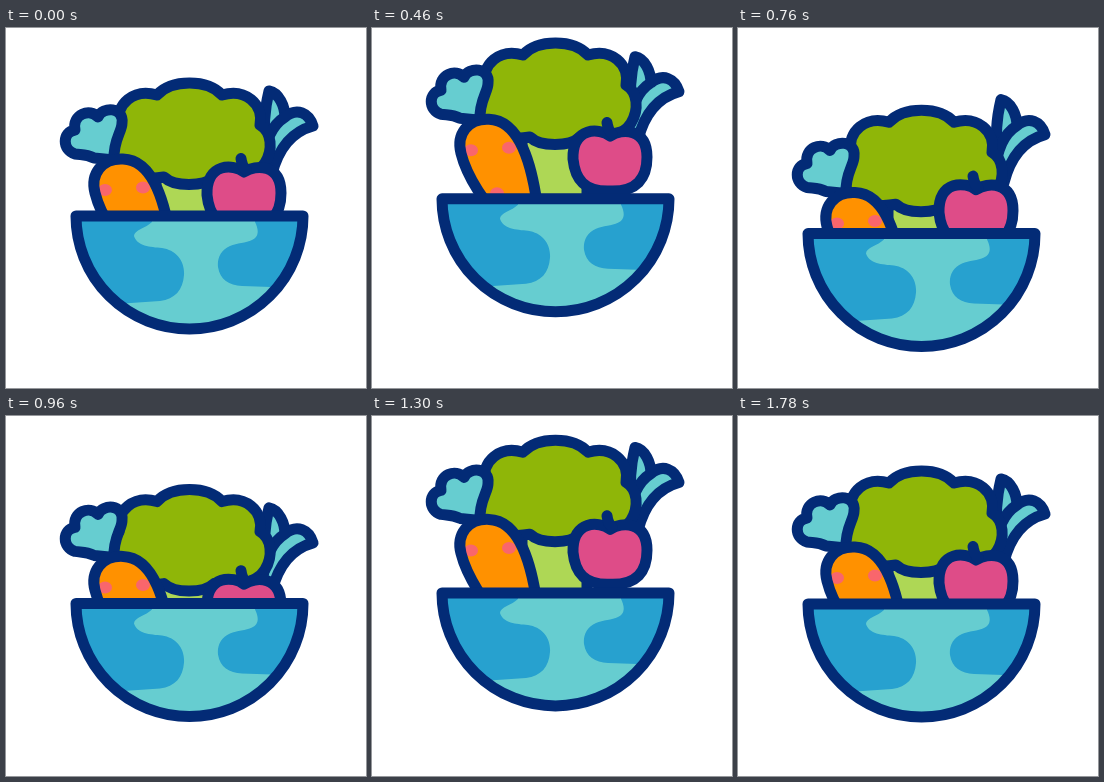
These frames come from a looping animation (360 by 360 pixels, 2.4 s). An HTML page:

```html
<!DOCTYPE html>
<html lang="en">
<head>
<meta charset="utf-8">
<title>Bouncing vegetable bowl</title>
<style>
  html, body { margin: 0; width: 100%; height: 100%; overflow: hidden; background: #fff; }
  svg { display: block; width: 100%; height: 100%; }
  .line { stroke: #032b76; stroke-width: 11; stroke-linejoin: round; stroke-linecap: round; }
  .cyan { fill: #66cdd0; }
  .blue { fill: #27a1cf; }
  .none { fill: none; }
</style>
</head>
<body>
<svg viewBox="0 0 360 360">
  <defs>
    <clipPath id="carrotShape">
      <path id="carrotPath" d="M117 131C96 130 84 146 89 165C94 185 110 215 145 250C164 255 168 235 165 215C160 180 149 132 117 131Z"/>
    </clipPath>
    <clipPath id="bowlShape">
      <path id="bowlPath" d="M70 188H297A113.5 113 0 0 1 70 188Z"/>
    </clipPath>
  </defs>

  <g id="leek" class="line cyan">
    <path d="M263 63C273 65 279 78 279 90C270 96 264 104 260 116C257 100 259 80 263 63Z"/>
    <path d="M307 98C303 85 291 79 279 89C266 97 259 112 256 140L266 146C272 122 285 104 307 98Z"/>
  </g>

  <g id="broccoli" class="line">
    <path fill="#aed755" d="M150 140H215V225H150Z"/>
    <path fill="#8fb608" d="M158 149C142 152 117 150 108 133C102 122 103 104 113 97C109 76 128 60 151 67C160 57 172 55 183.500 55C195 55 207 57 216 67C239 60 258 76 254 97C266 104 267 122 259 135C250 150 225 152 208 149C198 159 168 159 158 149Z"/>
  </g>

  <g id="carrot">
    <path class="line cyan" d="M88 130C80 126 76 127 69 126C56 122 56 104 69 102C66 86 84 80 92 89C97 78 118 79 116 95C116 104 107 112 108 132Z"/>
    <use href="#carrotPath" fill="#ff9100"/>
    <g clip-path="url(#carrotShape)" fill="#f9666c">
      <ellipse cx="99" cy="162" rx="7" ry="6"/>
      <ellipse cx="137" cy="159.500" rx="7" ry="6"/>
      <ellipse cx="125" cy="205" rx="7" ry="6"/>
    </g>
    <use href="#carrotPath" class="line none"/>
  </g>

  <g id="apple" class="line">
    <path fill="#de4c88" d="M238 144C228 136 200 134 201 167C203 187 212 200 238 199C265 200 275 186 275 165C275 136 250 136 238 144Z"/>
    <path class="none" d="M235 130.500Q236 138 240 142"/>
  </g>

  <g id="bowl">
    <use href="#bowlPath" class="cyan"/>
    <g class="blue" clip-path="url(#bowlShape)">
      <path d="M60 180H146V194C140 200 128 202 128 208C131 218 144 219 156 220C170 222 179 233 178 247C177 262 169 271 154 273L110 276L60 270Z"/>
      <path d="M310 180H249V194C253 202 253 209 246 212C240 215 231 215 224 218C215 222 211 230 212 239C214 252 223 257 236 258L280 259.500L310 250Z"/>
    </g>
    <use href="#bowlPath" class="line none"/>
  </g>
</svg>
<script>
const LOOP = 2400, BEAT = 375;

// Height of each part's first hop; each one trails the part before it.
const reach = { bowl: 20, carrot: 41, broccoli: 40, apple: 36.5, leek: 36 };
const peaks = [-1, 0.88, -0.88, 0];

const ease = p => (1 - Math.cos(Math.PI * p)) / 2;

// Up, down, up and back to rest, as a fraction of the reach.
function swing(t, lag) {
  const first = BEAT + lag;
  if (t < first) return peaks[0] * ease(t / first);
  const n = (t - first) / BEAT, i = Math.floor(n);
  if (i > 2) return 0;
  return peaks[i] + (peaks[i + 1] - peaks[i]) * ease(n - i);
}

function draw() {
  const t = performance.now() % LOOP;
  Object.keys(reach).forEach((id, i) => {
    const y = reach[id] * swing(t, 20 + 35 * i);
    document.getElementById(id).setAttribute("transform", `translate(0 ${y.toFixed(2)})`);
  });
  requestAnimationFrame(draw);
}
draw();
</script>
</body>
</html>
```
